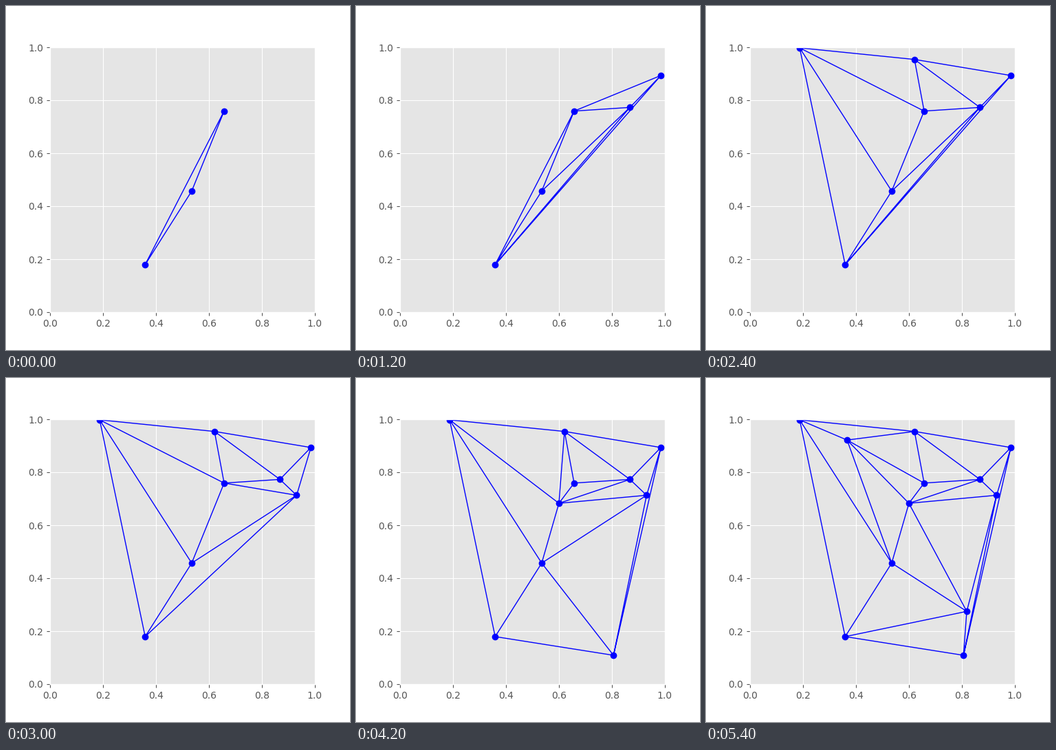
A matplotlib script that plays this animation: 500 px wide and 500 px high, repeating every 6000 ms.

```python
import numpy as np
import matplotlib.pyplot as plt
from matplotlib.animation import FuncAnimation
from matplotlib.tri import Triangulation

START = 3        # points in the first triangle
STEP_MS = 600    # one new point per step

# Scattered points in order of insertion; every edge follows from them.
POINTS = np.array([
    (0.3598, 0.1795), (0.5355, 0.4571), (0.6579, 0.7592),
    (0.9855, 0.8935), (0.8685, 0.7730), (0.1880, 0.9978),
    (0.6215, 0.9541), (0.9316, 0.7132), (0.6005, 0.6828),
    (0.8066, 0.1090), (0.8188, 0.2748), (0.3670, 0.9216),
])

plt.style.use("ggplot")
fig, ax = plt.subplots(figsize=(5, 5), dpi=100)
ax.set_aspect("equal")
ax.set_xlim(0, 1)
ax.set_ylim(0, 1)

edges, = ax.plot([], [], "b-", lw=1)
dots, = ax.plot([], [], "bo", ms=6)


def edge_path(pts):
    """Delaunay edges as one polyline, broken by NaN after each edge."""
    pairs = Triangulation(*pts.T).edges
    path = np.full((len(pairs), 3, 2), np.nan)
    path[:, :2] = pts[pairs]
    return path.reshape(-1, 2)


def update(step):
    pts = POINTS[:START + step]
    edges.set_data(*edge_path(pts).T)
    dots.set_data(*pts.T)
    return edges, dots


anim = FuncAnimation(fig, update, frames=len(POINTS) - START + 1,
                     interval=STEP_MS, repeat=True, repeat_delay=0)
plt.show()
```
